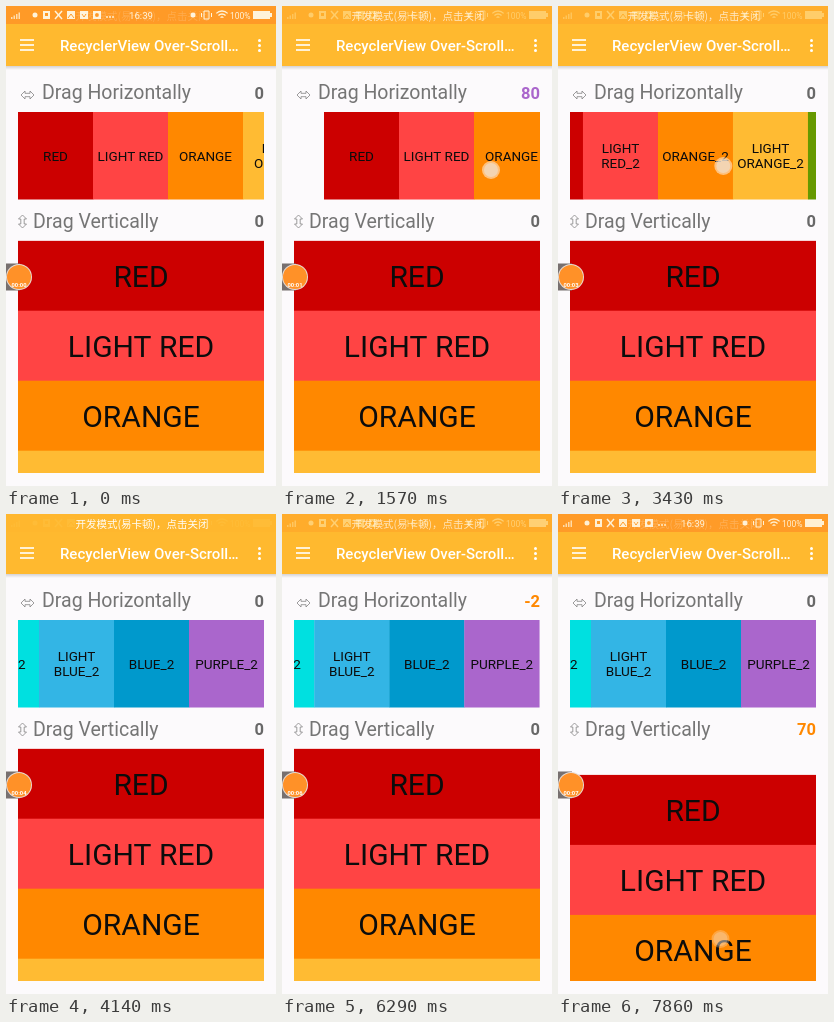
These frames come from a looping animation (270 px wide and 480 px high, 8000 ms). An HTML page with a canvas:

```html
<!DOCTYPE html>
<html lang="en">
<head>
<meta charset="utf-8">
<title>Over-scroll demo</title>
<style>
  html, body { margin: 0; height: 100%; overflow: hidden; background: #fcfafc; }
  canvas { display: block; width: 100vw; height: 100vh; }
</style>
</head>
<body>
<canvas id="stage"></canvas>
<script>
const W = 270, H = 480, LOOP = 8, FPS = 7;
const canvas = document.getElementById('stage');
const ctx = canvas.getContext('2d');

const ROBOTO = 'Roboto, sans-serif';
const CJK = '"Noto Sans CJK SC", "Noto Sans CJK", sans-serif';
const AMBER = '#ffb92f', GRAY = '#757575';

const COLORS = [
  ['RED', '#cc0000'], ['LIGHT RED', '#ff4444'],
  ['ORANGE', '#ff8800'], ['LIGHT ORANGE', '#ffbb33'],
  ['GREEN', '#669900'], ['LIGHT GREEN', '#99cc00'],
  ['CYAN', '#00e0e0'], ['LIGHT BLUE', '#33b5e5'],
  ['BLUE', '#0099cc'], ['PURPLE', '#aa66cc']
];
const ITEMS = [...COLORS, ...COLORS.map(([name, color]) => [name + '_2', color])];
const CELL = 75, ROW = 70;
const LEFT = 12, RIGHT = 258, MAX_SCROLL = ITEMS.length * CELL - (RIGHT - LEFT);

// Over-scroll drags: the list follows the finger at a third of its travel.
const PULLS = [
  { axis: 'x', x: 119, y: 164, travel: 112.5, down: 0.9, up: 1.842, back: 0.6, dragColor: '#aa66cc', backColor: '#33b5e5' },
  { axis: 'x', x: 161, y: 173, travel: -130.5, down: 4.8, up: 5.764, back: 0.6, dragColor: '#f04040', backColor: '#ff8800' },
  { axis: 'y', x: 165, y: 299, travel: 126, down: 6.735, up: 7.71, back: 0.7, dragColor: '#f04040', backColor: '#ff8800' }
];
const FLINGS = [2.85, 3.35].map(down => ({ axis: 'x', x: 220, y: 160, travel: -160, down, up: down + 0.2 }));

const clamp = v => Math.max(0, Math.min(1, v));
const smooth = v => v * v * (3 - 2 * v);
const easeOut = v => 1 - (1 - clamp(v)) ** 3;
const progress = (g, t) => smooth(clamp((t - g.down) / (g.up - g.down)));

function rect(x, y, w, h, color) {
  ctx.fillStyle = color;
  ctx.fillRect(x, y, w, h);
}

function circle(x, y, r, color) {
  ctx.fillStyle = color;
  ctx.beginPath();
  ctx.arc(x, y, r, 0, Math.PI * 2);
  ctx.fill();
}

function line(points, color, width = 1, closed = false) {
  ctx.strokeStyle = color;
  ctx.lineWidth = width;
  ctx.beginPath();
  points.forEach(([x, y]) => ctx.lineTo(x, y));
  if (closed) ctx.closePath();
  ctx.stroke();
}

function text(str, x, y, size, color, { align = 'left', weight = 400, family = ROBOTO } = {}) {
  ctx.font = `${weight} ${size}px ${family}`;
  ctx.textAlign = align;
  ctx.fillStyle = color;
  ctx.fillText(str, x, y);
}

function clipped(x, y, w, h, draw) {
  ctx.save();
  ctx.beginPath();
  ctx.rect(x, y, w, h);
  ctx.clip();
  draw();
  ctx.restore();
}

function overscroll(axis, t) {
  for (const g of PULLS) {
    if (g.axis !== axis || t < g.down || t > g.up + g.back) continue;
    const dragging = t < g.up;
    const part = dragging ? progress(g, t) : (1 - (t - g.up) / g.back) ** 2;
    const px = g.travel / 3 * part;
    const value = Math.round(px * 8 / 3);
    if (value) return { px, value, color: dragging ? g.dragColor : g.backColor };
  }
  return { px: 0, value: 0, color: '#686868' };
}

function statusBar(t) {
  const white = '#fff';
  rect(0, 0, W, 18, '#ff9326');
  // Notification icons
  ctx.globalAlpha = 0.75;
  [0, 1, 2, 3].forEach(i => rect(5 + i * 2.5, 11 - i * 1.5, 1.5, 2 + i * 1.5, white));
  ctx.globalAlpha = 1;
  circle(29, 9, 2.5, white);
  rect(37, 5, 7, 8, white);
  rect(39, 7, 3, 3, '#ff9326');
  line([[49, 5], [56, 13]], white, 1.5);
  line([[56, 5], [49, 13]], white, 1.5);
  rect(61, 5, 8, 8, white);
  line([[62, 12], [65, 8], [68, 12]], '#ff9326');
  rect(74, 5, 8, 8, white);
  line([[76, 8], [78, 11], [80, 8]], '#ff9326');
  rect(87, 5, 8, 8, white);
  circle(91, 9, 2, '#ff9326');
  [101, 104, 107].forEach(x => circle(x, 11, 0.9, white));

  text('16:39', 135, 13, 9.7, white, { align: 'center' });

  // System icons
  circle(187, 9, 2.5, white);
  line([[198, 5], [203, 5], [203, 13], [198, 13]], white, 1, true);
  line([[195.5, 7], [195.5, 11]], white);
  line([[205.5, 7], [205.5, 11]], white);
  [2, 5, 8].forEach(r => {
    ctx.beginPath();
    ctx.arc(216, 13, r, -Math.PI * 0.75, -Math.PI * 0.25);
    ctx.strokeStyle = white;
    ctx.lineWidth = 1.3;
    ctx.stroke();
  });
  text('100%', 224, 12.5, 8.5, white);
  rect(247, 5, 17, 8, white);
  rect(264, 7, 2, 4, white);

  // The developer notice pulses over the bar.
  ctx.globalAlpha = (1 + Math.cos((t - 1.05) / 2.9 * Math.PI * 2)) / 2;
  rect(0, 0, W, 18, AMBER);
  text('开发模式(易卡顿)，点击关闭', 136, 13.5, 10.5, white, { align: 'center', family: CJK });
  ctx.globalAlpha = 1;
}

function appBar() {
  const shadow = ctx.createLinearGradient(0, 60, 0, 64);
  shadow.addColorStop(0, 'rgba(0,0,0,.16)');
  shadow.addColorStop(1, 'rgba(0,0,0,0)');
  rect(0, 60, W, 4, shadow);
  rect(0, 18, W, 42, AMBER);
  [34, 39, 44].forEach(y => rect(14, y - 0.8, 14, 1.6, '#fff'));
  [34.5, 39.5, 44.5].forEach(y => circle(253.5, y, 1.5, '#fff'));
  text('RecyclerView Over-Scroll…', 54, 45, 15, '#fff', { weight: 500 });
}

function doubleArrow(x, y, angle, half) {
  const head = half - 4;
  ctx.save();
  ctx.translate(x, y);
  ctx.rotate(angle);
  line([[-half, 0], [-head, -4], [-head, -1.7], [head, -1.7], [head, -4],
        [half, 0], [head, 4], [head, 1.7], [-head, 1.7], [-head, 4]], '#858585', 0.8, true);
  ctx.restore();
}

function header(label, x, baseline, { value, color }) {
  text(label, x, baseline, 19.5, GRAY);
  text(value, RIGHT, baseline - 0.5, 16.5, color, { align: 'right', weight: 700 });
}

function horizontalList(t, shift) {
  const scroll = MAX_SCROLL * (easeOut((t - 2.85) / 0.7) + easeOut((t - 3.35) / 0.7)) / 2;
  clipped(LEFT, 106, RIGHT - LEFT, 87.5, () => ITEMS.forEach(([name, color], i) => {
    const x = LEFT + i * CELL - scroll + shift;
    if (x > RIGHT || x + CELL < LEFT) return;
    rect(x, 106, CELL + 0.3, 88, color);
    ctx.font = `13.5px ${ROBOTO}`;
    const lines = ctx.measureText(name).width > CELL ? name.split(' ') : [name];
    lines.forEach((part, n) => {
      const y = 154.5 + (n - (lines.length - 1) / 2) * 15.8;
      text(part, x + CELL / 2, y, 13.5, '#0c0c0c', { align: 'center' });
    });
  }));
}

function verticalList(shift) {
  clipped(LEFT, 234.5, RIGHT - LEFT, 232.5, () => ITEMS.slice(0, 4).forEach(([name, color], i) => {
    const y = 234.7 + i * ROW + shift;
    rect(LEFT, y, RIGHT - LEFT, ROW + 0.3, color);
    text(name, 135, y + 46.5, 30, '#0c0c0c', { align: 'center' });
  }));
}

function recorderButton(t) {
  rect(0, 257.5, 14, 27, '#77706f');
  circle(13, 271, 13, '#e8dcd4');
  circle(13, 271, 12, '#ff9128');
  text('00:0' + Math.floor(t), 13, 280.5, 5.8, '#fff', { align: 'center', weight: 700 });
}

function touches(t) {
  for (const g of [...PULLS, ...FLINGS]) {
    const alpha = t < g.down ? 0 : 1 - clamp((t - g.up) / 0.3);
    if (!alpha) continue;
    const moved = g.travel * progress(g, t);
    const x = g.axis === 'x' ? g.x + moved : g.x - moved * 0.02;
    const y = g.axis === 'y' ? g.y + moved : g.y;
    ctx.globalAlpha = alpha;
    circle(x, y, 9, 'rgba(255,240,225,.55)');
    circle(x, y, 7, 'rgba(235,225,215,.6)');
    ctx.globalAlpha = 1;
  }
}

function draw(t) {
  const across = overscroll('x', t), down = overscroll('y', t);
  rect(0, 0, W, H, '#fcfafc');
  appBar();
  statusBar(t);
  doubleArrow(21.5, 89, 0, 6.5);
  header('Drag Horizontally', 36, 93, across);
  horizontalList(t, across.px);
  doubleArrow(16.5, 215.5, Math.PI / 2, 6.5);
  header('Drag Vertically', 27, 221.5, down);
  verticalList(down.px);
  recorderButton(t);
  touches(t);
}

function resize() {
  const ratio = window.devicePixelRatio || 1;
  canvas.width = Math.round(innerWidth * ratio);
  canvas.height = Math.round(innerHeight * ratio);
}

function frame() {
  const seconds = performance.now() / 1000 % LOOP;
  const step = Math.floor((seconds + 0.003) * FPS) % (LOOP * FPS);
  ctx.setTransform(canvas.width / W, 0, 0, canvas.height / H, 0, 0);
  draw(step / FPS);
  requestAnimationFrame(frame);
}

addEventListener('resize', resize);
resize();
frame();
</script>
</body>
</html>
```
